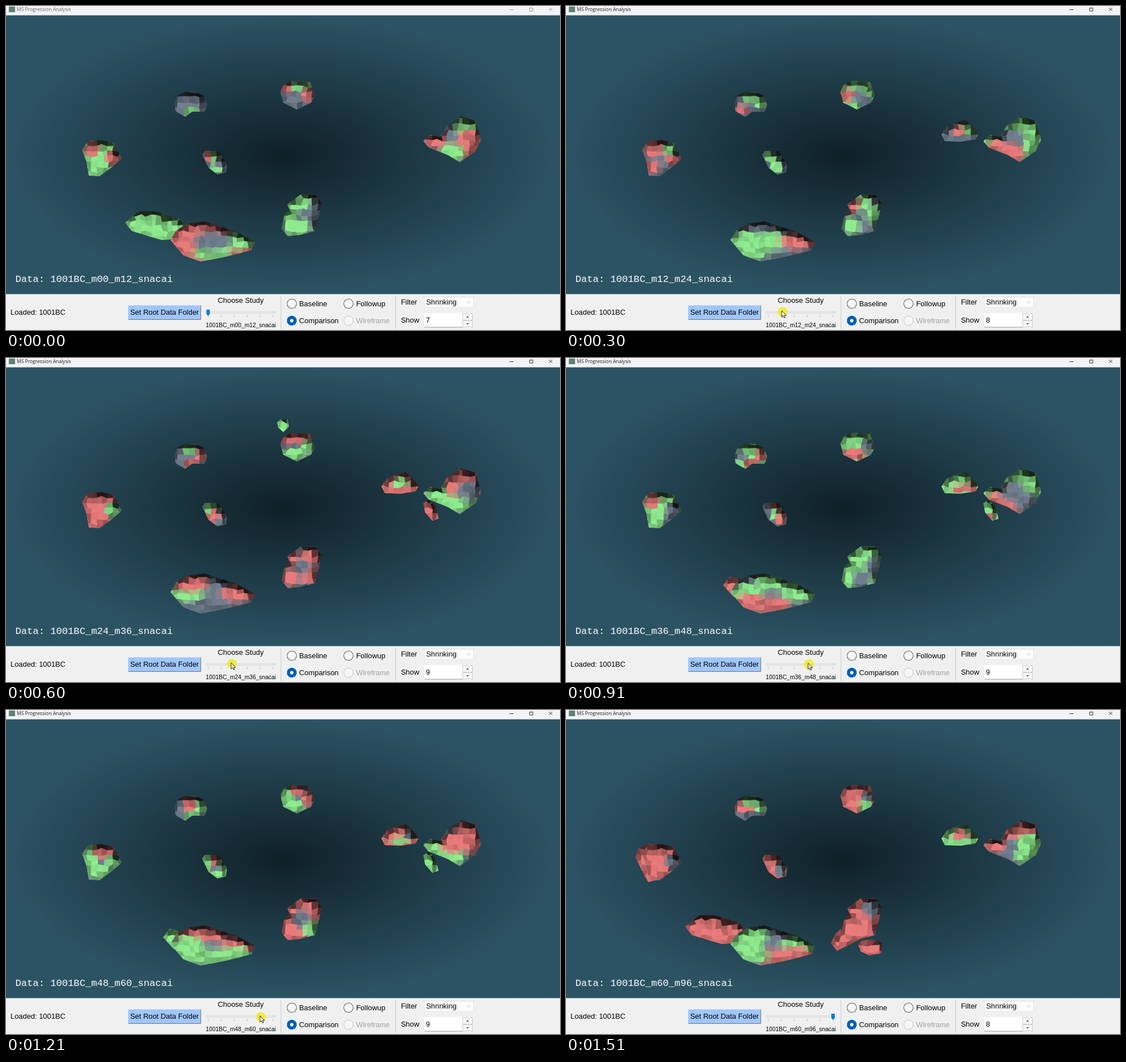
Animation, 977 px wide and 573 px high, one loop 1.81 s. Source, as an HTML page:

```html
<!DOCTYPE html>
<html lang="en">
<head>
<meta charset="utf-8">
<title>MS Progression Analysis</title>
<style>
html, body { margin: 0; width: 100%; height: 100%; overflow: hidden; background: #f0f0f0; }
svg { display: block; width: 977px; height: 573px; font: 12.9px "Liberation Sans", Arial, sans-serif; }
text { white-space: pre; }
</style>
</head>
<body>
<svg viewBox="0 0 977 573">
  <defs>
    <radialGradient id="sea"><stop stop-color="#0f2027"/><stop offset="1" stop-color="#2c5364"/></radialGradient>
  </defs>
  <rect width="977" height="573" fill="#f0f0f0"/>
  <rect width="977" height="16.5" fill="#f3f3f3"/>
  <rect x="5" y="1" width="11" height="10" fill="#5d8577"/>
  <g id="chrome">
    <text x="19" y="9.3" font-size="8.5" font-family="Open Sans, Noto Sans, sans-serif">MS Progression Analysis</text>
    <path d="M888 6.5h7M923.5 3.5h5.5v5.5h-5.5zM957.5 3l6 6m0-6l-6 6" fill="none" stroke="currentColor" stroke-width=".9"/>
  </g>
  <rect y="16.5" width="977" height="493" fill="url(#sea)"/>
  <g id="lesions"></g>
  <text id="data" x="16.5" y="488" fill="#fff" font-size="17.15" font-family="Liberation Mono, Courier New, monospace"></text>

  <text x="8" y="546">Loaded: 1001BC</text>
  <rect x="215.5" y="529.5" width="128" height="25" fill="#9fc6ff"/>
  <path d="M215.5 554.5h128v-25" fill="none" stroke="#6c7683"/>
  <text x="219" y="546">Set Root Data Folder</text>

  <text x="373.5" y="525">Choose Study</text>
  <rect x="352.5" y="540.5" width="123" height="3" fill="#e7e7e7" stroke="#dadada" stroke-width=".8"/>
  <path d="M356 548.7h116" stroke="#bdbdbd" stroke-width="3.5" stroke-dasharray="1 21.9"/>
  <path id="handle" d="M-3 537h6v8l-3 3-3-3z"/>
  <g id="pointer">
    <circle cx="1.5" cy="2" r="9" fill="#f5ea2b" fill-opacity=".85"/>
    <path d="M0 0v11l2.600-2.400 1.800 4 1.800-.8-1.800-3.800h3.600z" fill="#fff" stroke="#111" stroke-width=".9"/>
  </g>
  <text id="study" x="352.3" y="568" font-size="10.25"></text>

  <path d="M485 513v58M687 513v58" stroke="#c9c9c9"/>
  <g fill="#f7f7f7" stroke="#5f5f5f" stroke-width="1.1">
    <circle cx="504" cy="526.5" r="8.3"/>
    <circle cx="604" cy="526.5" r="8.3"/>
    <circle cx="604" cy="556.5" r="8.3" stroke="#c8c8c8"/>
    <circle cx="504" cy="556.5" r="5.8" fill="#fff" stroke="#0560b4" stroke-width="5.8"/>
  </g>
  <text x="517" y="531">Baseline</text>
  <text x="617.5" y="531">Followup</text>
  <text x="517" y="560.5">Comparison</text>
  <text x="617.5" y="560.5" fill="#a2a2a2">Wireframe</text>

  <text x="696.5" y="528">Filter</text>
  <rect x="738" y="515" width="86" height="18" fill="#fff" stroke="#e2e2e2"/>
  <text x="741" y="528">Shrinking</text>
  <path d="M813.5 523l2.500 2.500 2.500-2.500" fill="none" stroke="#999" stroke-width=".9"/>
  <text x="696.5" y="560">Show</text>
  <rect x="738" y="543" width="67" height="25" fill="#fff"/>
  <path d="M738 568h67" stroke="#9a9a9a"/>
  <path d="M805.5 544.5h17v11h-17zm0 12h17v11h-17z" fill="#f6f6f6" stroke="#cfcfcf"/>
  <path d="M812 551l2-2.500 2 2.500zm0 10l2 2.500 2-2.500z" fill="#333"/>
  <text id="count" x="740.5" y="560"></text>
</svg>
<script>
const $ = id => document.getElementById(id);
const LOOP = 1810;
const steps = [
  { start: 0, months: "m00_m12", count: 7 },
  { start: 300, months: "m12_m24", count: 8, tip: "380.5 539" },
  { start: 600, months: "m24_m36", count: 9, tip: "397 539" },
  { start: 910, months: "m36_m48", count: 9, tip: "427 539.5" },
  { start: 1210, months: "m48_m60", count: 9, tip: "448 541" },
  { start: 1510, months: "m60_m96", count: 8 }
];
const tints = { g: [143, 236, 143], r: [234, 123, 123], s: [112, 126, 142] };
const scenes = steps.map(() => "");

const clamp = (v, low = 0, high = 1) => Math.max(low, Math.min(high, v));

// Seeded by lattice position, between -0.5 and 0.5
function noise(i, j, k) {
  const v = Math.sin(i * 127.1 + j * 311.7 + k * 74.7) * 43758.5453;
  return v - Math.floor(v) - .5;
}

// Signed distance to the outline, positive inside
function depth(x, y, outline) {
  let best = 1e9, inside = false;
  outline.forEach(([ax, ay], i) => {
    const [bx, by] = outline[(i + 1) % outline.length];
    const dx = bx - ax, dy = by - ay;
    const t = clamp(((x - ax) * dx + (y - ay) * dy) / (dx * dx + dy * dy));
    best = Math.min(best, Math.hypot(x - ax - t * dx, y - ay - t * dy));
    if ((ay > y) !== (by > y) && x < ax + (y - ay) * dx / dy) inside = !inside;
  });
  return inside ? best : -best;
}

// "s gN rSE": base tint, then accents by compass direction; u, v run from -1 to 1
function tintAt(u, v, paint) {
  const [base, ...accents] = paint.split(" ");
  return accents.reduce((color, [tint, ...way]) => {
    const reach = way.length > 1 ? .52 : .62;
    const cx = way.includes("E") - way.includes("W"), cy = way.includes("S") - way.includes("N");
    const w = clamp(2.7 - Math.hypot(u - cx * reach, v - cy * reach) / .2);
    return color.map((c, i) => c + (tints[tint][i] - c) * w);
  }, tints[base]);
}

// A dome of flat quads, lit from the front, below and slightly left
function dome(outline) {
  const xs = outline.map(p => p[0]), ys = outline.map(p => p[1]);
  const left = Math.min(...xs), right = Math.max(...xs), top = Math.min(...ys), bottom = Math.max(...ys);
  const size = 9.5, round = Math.min(17, (bottom - top) * .4);
  const vertex = (i, j) => {
    const x = (i + noise(i, j, 1) * .55) * size, y = (j + noise(i, j, 2) * .55) * size;
    const d = depth(x, y, outline), t = clamp(d / round);
    return [x, y, round * Math.sqrt(t * (2 - t)) + clamp(d, -4, 0) + noise(i, j, 3) * 6, d];
  };
  const faces = [];
  for (let j = Math.floor(top / size) - 1; j * size < bottom + size; j++)
    for (let i = Math.floor(left / size) - 1; i * size < right + size; i++) {
      const quad = [vertex(i, j), vertex(i + 1, j), vertex(i + 1, j + 1), vertex(i, j + 1)];
      if (quad.every(p => p[3] < -9)) continue;
      const [a, b, c, d] = quad;
      const [ux, uy, uz] = c.map((v, k) => v - a[k]), [vx, vy, vz] = d.map((v, k) => v - b[k]);
      const n = [uy * vz - uz * vy, uz * vx - ux * vz, ux * vy - uy * vx];
      const light = (-.18 * n[0] + .33 * n[1] + .92 * n[2]) / Math.hypot(...n);
      const mean = k => quad.reduce((sum, p) => sum + p[k] / 4, 0);
      faces.push({
        points: quad.map(p => p[0].toFixed(1) + "," + p[1].toFixed(1)).join(" "),
        shade: clamp(light * 1.15 - .08, .16),
        u: (2 * mean(0) - left - right) / (right - left),
        v: (2 * mean(1) - top - bottom) / (bottom - top)
      });
    }
  return faces;
}

let serial = 0;
// One paint per step, separated by bars; an empty one hides the lesion
function lesion(shape, paints) {
  const outline = shape.split(", ").map(p => p.split(" ").map(Number));
  const faces = dome(outline), id = "clip" + serial++;
  paints.split("|").forEach((paint, step) => {
    if (!paint) return;
    const quads = faces.map(f => {
      const fill = `rgb(${tintAt(f.u, f.v, paint).map(c => Math.round(c * f.shade))})`;
      return `<polygon points="${f.points}" fill="${fill}" stroke="${fill}"/>`;
    });
    scenes[step] += `<clipPath id="${id}-${step}"><polygon points="${outline}"/></clipPath>
      <g clip-path="url(#${id}-${step})" stroke-width=".7">${quads.join("")}</g>`;
  });
}

// Upper left
lesion("297 172, 303 158, 315 152, 333 152, 348 158, 355 174, 350 187, 328 187, 316 196, 299 186",
  "s gS|s gN gE rSW|s gN rE rS|g rE rS sW|s rN rC gE gS|s rW rC gN gE");
// Top centre
lesion("484 152, 489 140, 503 132, 536 134, 545 158, 538 171, 513 183, 489 171",
  "s rNW gN gNE rE|g sC rW sSE|s rNW rNE rN gSW gS gE|g sE rS rSW|s gW gS gNW gSW rN rE|r sE gSE");
lesion("478 114, 484 108, 497 109, 499 121, 489 131, 480 123", "||g");
// Small, centre left
lesion("346 263, 351 256, 376 257, 382 268, 390 279, 388 294, 373 298, 357 286",
  "s rNW gN gS|s gNW gC gS|s gN gNW rC rSW|s rE rN gC rSE|g sC rN|r sSE sE");
// Left, with the part that grows last
lesion("122 260, 128 245, 145 236, 165 240, 165 300, 145 304, 138 292", "|||||r");
lesion("134 254, 145 239, 168 237, 190 242, 204 270, 188 284, 165 301, 146 300, 142 276",
  "g rE rNW|s rNW rN rSW rE gNE|r sE gE|g sE sSE rNW|s gW gNW gSW gS rN rNE gE|r sE");
// Right
lesion("736 239, 748 228, 766 232, 776 213, 803 195, 828 203, 838 236, 828 257, 800 276, 780 264, 745 250",
  "s rW rSE gNE rS rE gS|g sC rSW rS|r gW gS gSW gSE sE|g rS rSW sSE sC|s gW gS gSW rC rNE rE|s rW rN rNE gE gSE");
lesion("736 257, 745 251, 757 262, 763 284, 752 288, 739 273", "||r|g rS|g");
// Upper right
lesion("662 227, 672 213, 690 205, 705 202, 717 213, 728 226, 722 236, 696 240, 668 239",
  "|s rC gE gNE|r gC|g rSE rS|r sE gS|g rC");
// Lower centre, with a foot that grows last
lesion("467 412, 476 395, 495 378, 520 392, 518 406, 490 420, 478 426", "|||||r");
lesion("486 394, 490 372, 500 360, 496 351, 520 333, 545 333, 557 350, 551 375, 545 398, 518 405, 497 407",
  "s gNW gW gSW gN gS|s gN rNW gSW gE|s rNW rSW rSE rNE|g sE sS|r sC gSE|r sNE");
lesion("515 415, 522 406, 545 406, 557 412, 556 430, 535 434, 520 427", "|||||r");
// Lower left, with tails that come and go
lesion("210 383, 235 363, 262 363, 305 376, 320 395, 300 412, 275 414, 245 405, 222 398", "g|||||r");
lesion("277 402, 288 387, 305 390, 320 400, 297 424", "|||r|g");
lesion("290 414, 300 397, 320 385, 350 381, 385 392, 410 401, 439 417, 433 432, 385 444, 343 452, 313 441",
  "r gE gS sC|s gW gC rE gSW|s gW rE rNW|s gW gN gNE gE rS rSW|s rNW rN rE gW gS gSW gSE|s gW gE rS rSE gSW gNW");

$("lesions").innerHTML = scenes.map(s => `<g>${s}</g>`).join("");
const groups = [...$("lesions").children];

let shown = -1;
function render(time) {
  const index = steps.filter(s => s.start <= time % LOOP).length - 1;
  if (index === shown) return;
  shown = index;
  const { months, count, tip } = steps[index];
  const name = `1001BC_${months}_snacai`;
  groups.forEach((g, i) => g.setAttribute("display", i === index ? "inline" : "none"));
  $("data").textContent = "Data: " + name;
  $("study").textContent = name;
  $("count").textContent = count;
  $("handle").setAttribute("transform", `translate(${356.5 + index * 22.9} 0)`);
  $("handle").setAttribute("fill", tip ? "#cccccc" : "#0f7bd6");
  $("pointer").setAttribute("display", tip ? "inline" : "none");
  if (tip) $("pointer").setAttribute("transform", `translate(${tip})`);
  $("chrome").setAttribute("color", index ? "#1a1a1a" : "#8a8a8a");
  $("chrome").setAttribute("fill", index ? "#1a1a1a" : "#666");
}

function tick() {
  render(performance.now());
  requestAnimationFrame(tick);
}
tick();
</script>
</body>
</html>
```
